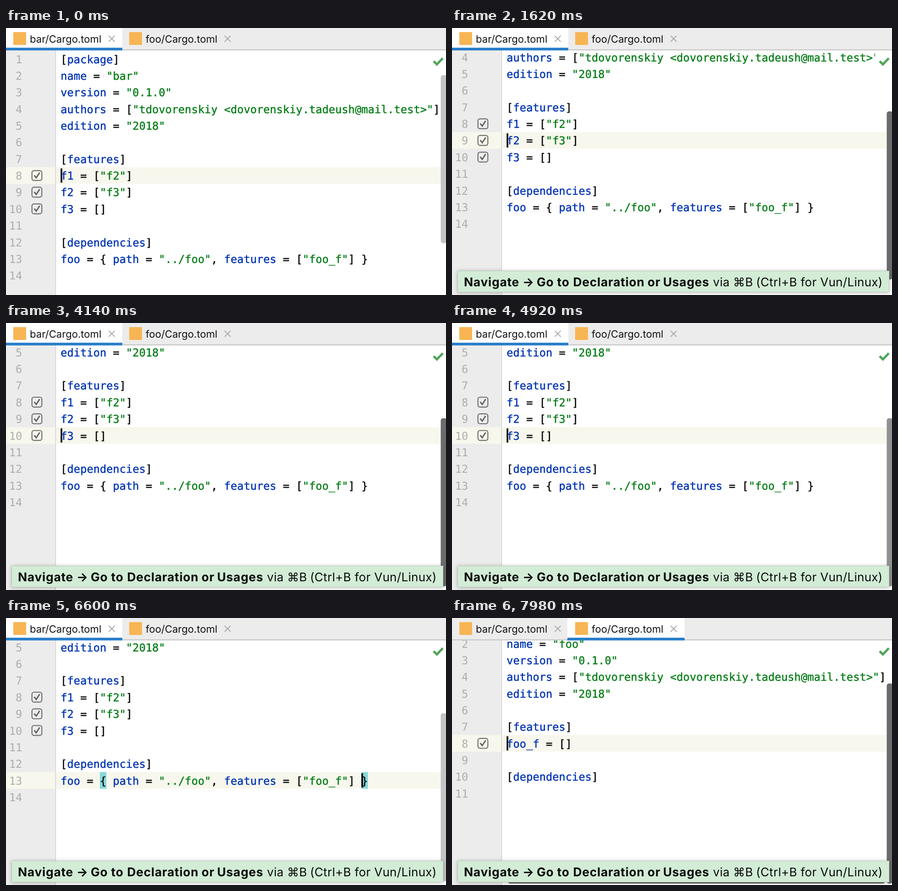
An HTML page for the animation above (8000 ms loop, 961 by 583 pixels).

```html
<!DOCTYPE html>
<html lang="en">
<head>
<meta charset="utf-8">
<title>Cargo features navigation</title>
<style>
  html, body { margin: 0; width: 100%; height: 100%; overflow: hidden; background: #fff; }
  svg { display: block; width: 100%; height: 100%; }
  text { white-space: pre; text-rendering: geometricPrecision; }
  .code text { font: 23.72px "DejaVu Sans Mono", monospace; stroke-width: .45px; }
  .ui { font: 22.1px Inter, sans-serif; }
  .tip { font: 26px Inter, "DejaVu Sans", sans-serif; letter-spacing: .3px; }
  .tip.bold { font-size: 26.4px; font-weight: 700; letter-spacing: .75px; }
  .hint { filter: drop-shadow(0 1px 4px #0004); }
</style>
</head>
<body>
<svg id="stage" viewBox="0 0 961 583" preserveAspectRatio="none">
  <defs><clipPath id="view"><rect y="49" width="961" height="534"/></clipPath></defs>
</svg>
<script>
const LOOP = 8000, ROW = 36.36, TOP = 67.6, LEFT = 119.3, CHAR = 14.28;
const stage = document.getElementById('stage');

function set(node, attrs) {
  for (const k in attrs) node.setAttribute(k, attrs[k]);
  return node;
}
function add(parent, tag, attrs, text) {
  const node = set(document.createElementNS('http://www.w3.org/2000/svg', tag), attrs || {});
  if (text !== undefined) node.textContent = text;
  return parent.appendChild(node);
}
const box = (parent, x, y, width, height, fill, rx = 0) =>
  add(parent, 'rect', { x, y, width, height, fill, rx });
const line = (parent, d, stroke, width) =>
  add(parent, 'path', { d, stroke, 'stroke-width': width, fill: 'none' });
const show = (node, on) => node.setAttribute('visibility', on ? 'visible' : 'hidden');
const rowY = n => TOP + ROW * (n - 1);
const colX = c => LEFT + CHAR * c;

const AUTHOR = 'authors = ["tdovorenskiy <dovorenskiy.tadeush@mail.test>"]';
const head = name => ['[package]', `name = "${name}"`, 'version = "0.1.0"', AUTHOR,
  'edition = "2018"', '', '[features]'];
const files = [
  { lines: [...head('bar'), 'f1 = ["f2"]', 'f2 = ["f3"]', 'f3 = []', '', '[dependencies]',
      'foo = { path = "../foo", features = ["foo_f"] }', ''], checks: [8, 9, 10] },
  { lines: [...head('foo'), 'foo_f = []', '', '[dependencies]', ''], checks: [8] }
];

// Editor
const editor = add(stage, 'g', { 'clip-path': 'url(#view)' });
box(editor, 0, 49, 961, 534, '#fff');
box(editor, 0, 49, 108, 534, '#ececec');
const current = box(editor, 0, 0, 961, ROW, '#f8f7ed');
box(editor, 107.7, 49, 1.4, 534, '#d0d0d0');
const braces = [0, 1].map(() => box(editor, 0, 0, CHAR, ROW, '#85d9d8'));

function colorOf(token) {
  if (token[0] === '"') return '#067d17';
  return /\w/.test(token) ? '#0033b3' : '#080808';
}
const pages = files.map(({ lines, checks }) => {
  const page = add(editor, 'g', { class: 'code' });
  lines.forEach((src, i) => {
    const y = rowY(i + 1) + 9;
    add(page, 'text', { x: 35.3, y, fill: '#adadad', 'text-anchor': 'end' }, i + 1);
    const text = add(page, 'text', { y });
    for (const m of src.matchAll(/"[^"]*"|\w+|[^\s\w"]/g)) {
      const fill = colorOf(m[0]);
      add(text, 'tspan', { x: colX(m.index), fill, stroke: fill }, m[0]);
    }
  });
  for (const n of checks) {
    const g = add(page, 'g', { transform: `translate(67.5 ${rowY(n)})` });
    set(box(g, -10.8, -10.8, 21.6, 21.6, 'none', 4.5), { stroke: '#6e6e6e', 'stroke-width': 2.2 });
    line(g, 'M-5.8 -.5L-1.5 5L6 -6.5', '#5f5f5f', 2.8);
  }
  return page;
});
const caret = box(editor, 0, 0, 3.6, 31, '#000');
box(editor, 924, 49, 25, 42, '#fff');
line(editor, 'M934 72.5L941 79.5L954 66', '#4fa557', 5);
const thumb = box(editor, 949.5, 0, 13, 367, '#c4c4c4', 5);
const hthumb = box(editor, 122, 569, 824, 11, '#6b6b6b', 5);

// Tabs
box(stage, 0, 0, 961, 49, '#ececec');
box(stage, 0, 46.5, 961, 2.5, '#cbcbcb');
const tabs = ['bar', 'foo'].map((name, i) => {
  const x = i * 253, from = i ? 252 : 0, to = i ? 508 : 254;
  const active = add(stage, 'g');
  box(active, from, 0, to - from, 44, '#fff');
  box(active, from, 43, to - from, 6, '#2a7fca');
  box(stage, x + 16, 9, 28, 28, '#f8b554');
  add(stage, 'text', { class: 'ui', x: x + 52, y: 31.5, fill: '#111' }, name + '/Cargo.toml');
  line(stage, `M${x + 224.5} 17l13 13m0 -13l-13 13`, '#aaa', 1.9);
  return active;
});

// Hint banner
const tip = add(stage, 'g');
set(box(tip, 12.5, 530.5, 942, 46, '#d2ecd6'), { class: 'hint', stroke: '#bccfbf', 'stroke-width': 1 });
function words(style, list) {
  for (const [x, word] of list)
    add(tip, 'text', { class: 'tip ' + style, x, y: 563.5, fill: '#0b0b0b' }, word);
}
words('bold', [[26, 'Navigate'], [154, '→'], [185, 'Go to'], [264.5, 'Declaration'], [427, 'or'], [461, 'Usages']]);
words('', [[570, 'via'], [614, '⌘B'], [664, '(Ctrl+B for Vun/Linux)']]);

// Views: where the editor jumps to
const views = [
  { at: 0, file: 0, scroll: 0, thumb: 103, size: 367 },
  { at: 1460, file: 0, scroll: 113, thumb: 182, size: 367 },
  { at: 3910, file: 0, scroll: 149.3, thumb: 208, size: 367 },
  { at: 7850, file: 1, scroll: 48.4, thumb: 143, size: 437 }
];

// Caret stops as [time, line, column]
const walk = (at, gap, row, col, count, dir) =>
  Array.from({ length: count }, (_, i) => [at + gap * i, row, col + dir * (i + 1)]);
const stops = [
  [0, 8, 0], ...walk(180, 110, 8, 0, 7, 1),
  [1460, 9, 0], ...walk(2620, 150, 9, 0, 7, 1),
  [3910, 10, 0], [5250, 11, 0], [5450, 12, 0], [5650, 13, 0], [6200, 13, 47],
  ...walk(6500, 160, 13, 47, 5, -1),
  [7850, 8, 0]
];

const PAIRS = { '[': ']', ']': '[', '{': '}', '}': '{' };
function pairAt(src, col) {
  for (const i of [col, col - 1])
    if (PAIRS[src[i]]) return [i, src.indexOf(PAIRS[src[i]])];
  return null;
}

function render(t) {
  const view = views.findLast(v => v.at <= t);
  const [moved, row, col] = stops.findLast(s => s[0] <= t);
  const y = rowY(row) - view.scroll;

  pages.forEach((page, i) => {
    show(page, i === view.file);
    show(tabs[i], i === view.file);
    set(page, { transform: `translate(0 ${-view.scroll})` });
  });
  set(current, { y: y - ROW / 2 });
  set(caret, { x: colX(col), y: y - 15.5 });
  show(caret, (t - moved) % 1000 < 500);

  const pair = pairAt(files[view.file].lines[row - 1], col);
  braces.forEach((b, i) => {
    show(b, pair);
    if (pair) set(b, { x: colX(pair[i]), y: y - ROW / 2 });
  });

  // The scrollbar is dark after a jump, then fades
  const fade = view.at ? Math.min(1, Math.max(0, (t - view.at - 960) / 120)) : 1;
  const grey = Math.round(107 + 89 * fade);
  set(thumb, { y: view.thumb, height: view.size, fill: `rgb(${grey},${grey},${grey})` });
  show(hthumb, view.file === 1);
  show(tip, view.at > 0);
}

const start = performance.now();
function tick() {
  render((performance.now() - start) % LOOP);
  requestAnimationFrame(tick);
}
tick();
</script>
</body>
</html>
```
